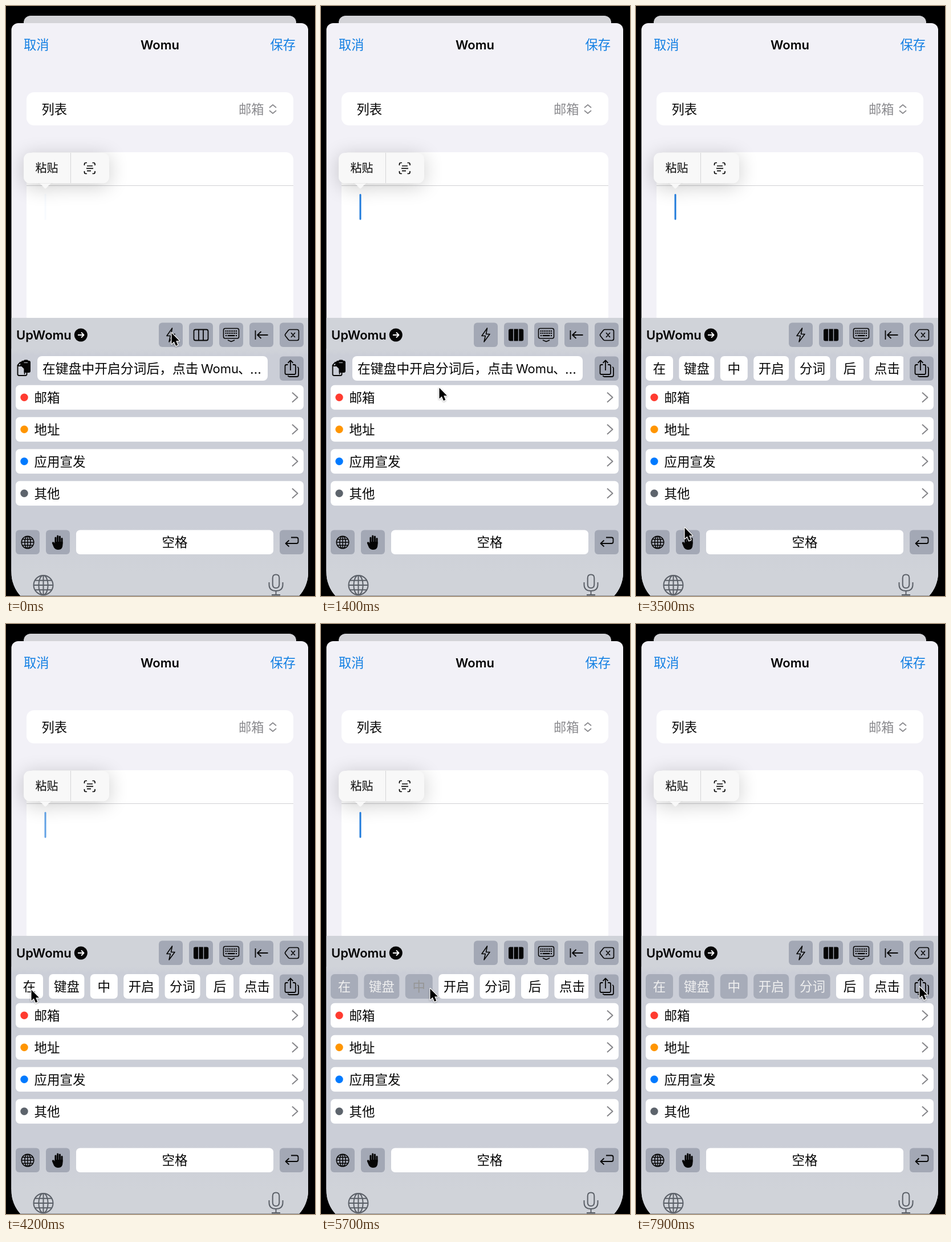
An HTML page with a canvas that plays this animation: 542 by 1033 pixels, repeating every 8000 ms.

```html
<!DOCTYPE html>
<html lang="zh">
<head>
<meta charset="utf-8">
<style>
html, body { margin: 0; width: 100%; height: 100%; overflow: hidden; background: #000; }
canvas { display: block; }
</style>
</head>
<body>
<canvas id="stage" width="542" height="1033"></canvas>
<script>
const ctx = document.getElementById('stage').getContext('2d');
const LOOP = 8000, STEP = 100;
const FONT = 'Inter, "Noto Sans CJK SC", "Noto Sans CJK", sans-serif';
const KEY = '#a3a8b5', INK = '#050505', BLUE = '#117fe3';

// time, x, y of the pointer tip
const POINTER = [
  [0, 290, 572], [400, 338, 577], [900, 342, 577], [1200, 255, 690], [1400, 207, 668],
  [1800, 198, 642], [2700, 198, 642], [3200, 72, 985], [3300, 72, 985], [3500, 85, 913],
  [4200, 44, 640], [4500, 44, 640], [4900, 91, 639], [5300, 152, 640], [5700, 191, 638],
  [6200, 217, 640], [6600, 217, 640], [6900, 277, 640], [7200, 308, 640], [7500, 443, 638],
  [7700, 495, 635], [8000, 498, 635]
];
const COLUMNS_ON = 700, SPLIT_ON = 2000;
// word, time of the tap
const WORDS = [
  ['在', 4450], ['键盘', 5050], ['中', 5650], ['开启', 6401], ['分词', 7150],
  ['后', Infinity], ['点击', Infinity]
];
const ROWS = [['邮箱', '#ff3b30'], ['地址', '#ff9500'], ['应用宣发', '#007aff'], ['其他', '#5d646c']];

const clamp = v => Math.min(1, Math.max(0, v));

function box(x, y, w, h, r, fill) {
  ctx.beginPath();
  ctx.roundRect(x, y, w, h, r);
  ctx.fillStyle = fill;
  ctx.fill();
}

function text(str, x, cy, size, { color = INK, weight = 400, align = 'left' } = {}) {
  ctx.font = `${weight} ${size}px ${FONT}`;
  ctx.textAlign = align;
  ctx.fillStyle = color;
  ctx.fillText(str, x, cy + size * 0.37);
}

function line(d, width = 1.8, color = INK) {
  ctx.strokeStyle = color;
  ctx.lineWidth = width;
  ctx.stroke(new Path2D(d));
}

function solid(d, color = INK) {
  ctx.fillStyle = color;
  ctx.fill(new Path2D(d));
}

function key(x, y) { box(x, y, 42, 42.5, 6, KEY); }

function globe(x, y, r, width, color) {
  ctx.strokeStyle = color;
  ctx.lineWidth = width;
  ctx.beginPath();
  ctx.arc(x, y, r, 0, 7);
  ctx.moveTo(x + r * 0.48, y);
  ctx.ellipse(x, y, r * 0.48, r, 0, 0, 7);
  ctx.moveTo(x, y - r);
  ctx.lineTo(x, y + r);
  for (const [dy, half] of [[-0.48, 0.86], [0, 1], [0.48, 0.86]]) {
    ctx.moveTo(x - r * half, y + r * dy);
    ctx.lineTo(x + r * half, y + r * dy);
  }
  ctx.stroke();
}

function form() {
  box(31, 17, 478, 40, 12, '#d4d4d8');
  ctx.save();
  ctx.beginPath();
  ctx.roundRect(9.5, 30, 520.5, 1022, [12, 12, 60, 60]);
  ctx.clip();
  ctx.fillStyle = '#f2f1f7';
  ctx.fillRect(0, 0, 542, 1033);
  text('取消', 31, 68, 22.3, { color: BLUE });
  text('Womu', 270, 68, 22, { weight: 600, align: 'center' });
  text('保存', 463.5, 68, 22.3, { color: BLUE });

  box(36, 151, 468, 58, 13, '#fff');
  text('列表', 62.5, 181, 22.3);
  text('邮箱', 408, 181, 22.3, { color: '#8a8a8e' });
  line('M462 178l6-5 6 5M462 183l6 5 6-5', 1.7, '#8a8a8e');

  box(36, 256, 468, 300, 13, '#fff');
  ctx.fillStyle = '#d1d1d4';
  ctx.fillRect(36, 314, 468, 1);
}

function pasteMenu() {
  ctx.save();
  ctx.shadowColor = 'rgba(0,0,0,.2)';
  ctx.shadowBlur = 34;
  ctx.shadowOffsetY = 5;
  const bubble = new Path2D();
  bubble.roundRect(31, 257, 150, 53.5, 11);
  bubble.addPath(new Path2D('M56 310Q60 310.5 63 314L67 318.5Q69 320.5 71 318.5L75 314Q78 310.5 82 310Z'));
  ctx.fillStyle = '#f8f8f8';
  ctx.fill(bubble);
  ctx.restore();
  ctx.fillStyle = '#d4d4d6';
  ctx.fillRect(113, 257, 1, 53);
  text('粘贴', 51.5, 284, 20);
  line('M137.500 279v-2q0-2.500 2.500-2.500h2M151.500 274.500h2q2.500 0 2.500 2.500v2M156 289v2q0 2.500-2.500 2.500h-2M142 293.500h-2q-2.500 0-2.500-2.500v-2M142 280h10M141 284.300h12M142 288.600h7', 1.7);
}

function caret(t) {
  const phase = t % 1000;
  const alpha = phase < 500 ? clamp((phase + 10) / 300) : clamp((900 - phase) / 200);
  ctx.globalAlpha = alpha;
  box(67.5, 329, 3, 45.5, 1.5, '#207bdb');
  ctx.globalAlpha = 1;
}

function toolbar(t) {
  text('UpWomu', 18, 576, 22, { weight: 600 });
  box(119.8, 564.5, 23, 23, 11.5, INK);
  line('M126 576h10M132 571.500l4.500 4.500-4.500 4.500', 1.9, '#fff');
  for (let i = 0; i < 5; i++) key(268 + 53 * i, 554.5);

  line('M291.500 564L282 577.500h6.300L286 588l10-13.500h-6.500Z', 1.6);
  if (t >= COLUMNS_ON) {
    box(329, 565.5, 8, 21, [3, 0, 0, 3], INK);
    box(338.4, 565.5, 7.4, 21, 0, INK);
    box(347.2, 565.5, 8, 21, [0, 3, 3, 0], INK);
  } else {
    line('M332.500 566.500h19q3 0 3 3v13q0 3-3 3h-19q-3 0-3-3v-13q0-3 3-3ZM338 566.500v19M346 566.500v19', 1.8);
  }
  line('M384.500 564.500h21q3 0 3 3v11.500q0 3-3 3h-21q-3 0-3-3v-11.500q0-3 3-3ZM389 585l6 2.500 6-2.500', 1.6);
  ctx.fillStyle = INK;
  for (let row = 0; row < 2; row++)
    for (let i = 0; i < 7; i++) ctx.fillRect(384.5 + i * 3.1, 568 + row * 3.8, 2, 2.2);
  ctx.fillRect(385, 576, 2, 2.2);
  ctx.fillRect(388.5, 576, 13, 2.2);
  ctx.fillRect(403, 576, 2, 2.2);
  line('M437.500 568v16M459.500 576h-18M447.500 570l-6.500 6 6.500 6', 1.8);
  line('M498 566.500h12.500q3 0 3 3v13q0 3-3 3H498q-1.500 0-2.500-1l-5.500-7q-1.200-1.500 0-3l5.500-7q1-1 2.500-1ZM500 572l7 8M507 572l-7 8', 1.7);
}

function preview() {
  line('M34 624h-9l-4.500 5v15.500q0 2.500 2.500 2.500h11q2.500 0 2.500-2.500V641M21 630h5v-5', 1.9);
  box(26.5, 621, 16.5, 21, 3, INK);
  box(31, 619.5, 8, 5, 2, INK);
  line('M31.500 624.500h6.500', 1.2, '#cbced7');
  solid('M25 624.500l7.500 7V641H26Z');
  solid('M22 631h5.500l4 4v9.500H22Z', '#cbced7');
  line('M21 630h6.500l5 5v10', 1.5);

  box(55, 613, 404, 43, 8, '#fff');
  text('在键盘中开启分词后，点击', 64, 635, 22.8);
  text('Womu', 342, 635, 22);
  text('、', 407, 635, 22.5);
  text('…', 428, 635, 23);
}

function words(t) {
  ctx.save();
  ctx.beginPath();
  ctx.rect(10, 600, 459, 60);
  ctx.clip();
  let x = 17;
  for (const [word, tap] of WORDS) {
    const width = word.length > 1 ? 62 : 48;
    const tapped = t >= tap;
    const tone = Math.round(240 * clamp((t - tap) / 80));
    box(x, 613, width, 43, 7, tapped ? '#a7acb9' : '#fff');
    text(word, x + width / 2, 635, 22.5, { color: tapped ? `rgb(${tone},${tone},${tone})` : INK, align: 'center' });
    x += width + 10.4;
  }
  ctx.restore();
}

function share() {
  key(480, 613.5);
  line('M494.500 628h-2.500q-2.500 0-2.500 2.500v12q0 2.500 2.500 2.500h13.500q2.500 0 2.500-2.500v-12q0-2.500-2.500-2.500h-2.500M499 638v-17M494.500 625l4.500-4.500 4.500 4.500M511 632q2 .500 2 2.500v11.500q0 3-3 3h-13q-2 0-2.500-2', 1.8);
}

function rows() {
  ROWS.forEach(([label, color], i) => {
    const cy = 685.3 + 56 * i;
    box(17, cy - 21.5, 505, 43, 7, '#fff');
    box(25.3, cy - 6.7, 13.4, 13.4, 6.7, color);
    text(label, 49.5, cy, 22.5);
    line(`M502 ${cy - 8.5}l9.500 8.500-9.500 8.500`, 2, '#858589');
  });
}

function hand() {
  ctx.lineCap = 'round';
  line('M87 940v-9M90.700 939v-11M94.400 939v-10M98 941v-8.500', 3.1);
  solid('M85.500 938h14v5q0 9-8 9-5 0-7.500-4l-3-7q-.700-2 .800-2.600 1.600-.500 2.700 1.200l1 1.400Z');
  ctx.lineCap = 'butt';
}

function bottomKeys() {
  key(17, 917.5);
  key(70, 917.5);
  box(123, 917.5, 346, 42.5, 7, '#fff');
  key(480, 917.5);
  globe(38, 939, 10.8, 1.5, INK);
  hand();
  text('空格', 296, 939, 22.5, { align: 'center' });
  line('M500 930.500h9.500q3 0 3 3v4.500q0 3-3 3h-18.500M496.500 935.500l-6 5.500 6 5.500', 1.8);

  const grey = '#5a5f67';
  globe(65.5, 1014, 17, 2, grey);
  line('M473.500 995.500q5.800 0 5.800 6v11q0 6.500-5.800 6.500t-5.800-6.500v-11q0-6 5.800-6ZM461.500 1009v4q0 11 12 11t12-11v-4M473.500 1024v7M466 1031h15', 2, grey);
}

function keyboard(t) {
  ctx.fillStyle = '#d0d3d9';
  ctx.fillRect(0, 546, 542, 487);
  const panel = ctx.createLinearGradient(0, 600, 0, 990);
  panel.addColorStop(0, '#d0d3d9');
  panel.addColorStop(0.03, '#cbced7');
  panel.addColorStop(0.8, '#cbced7');
  panel.addColorStop(1, '#d0d3d9');
  ctx.fillStyle = panel;
  ctx.fillRect(0, 600, 542, 390);
  toolbar(t);
  if (t < SPLIT_ON) preview(); else words(t);
  share();
  rows();
  bottomKeys();
  ctx.fillStyle = '#8f9298';
  ctx.fillRect(0, 1032, 542, 1);
}

function pointer(t) {
  const i = POINTER.findIndex(p => p[0] > t);
  const [t0, x0, y0] = POINTER[i - 1], [t1, x1, y1] = POINTER[i];
  const k = (t - t0) / (t1 - t0);
  ctx.save();
  ctx.translate(x0 + (x1 - x0) * k, y0 + (y1 - y0) * k);
  ctx.shadowColor = 'rgba(0,0,0,.3)';
  ctx.shadowBlur = 3;
  ctx.shadowOffsetY = 1;
  const arrow = 'M0.500 0.500V19.500L4.800 15.500 8 23 11.300 21.600 8.200 14.300H14Z';
  line(arrow, 2.6, '#fff');
  ctx.shadowColor = 'transparent';
  solid(arrow, '#000');
  ctx.restore();
}

function draw(t) {
  ctx.lineJoin = 'round';
  ctx.fillStyle = '#000';
  ctx.fillRect(0, 0, 542, 1033);
  form();
  pasteMenu();
  caret(t);
  keyboard(t);
  ctx.restore(); // ends the screen clip opened in form()
  pointer(t);
}

function tick() {
  draw(Math.floor(performance.now() % LOOP / STEP) * STEP);
  requestAnimationFrame(tick);
}
tick();
</script>
</body>
</html>
```
